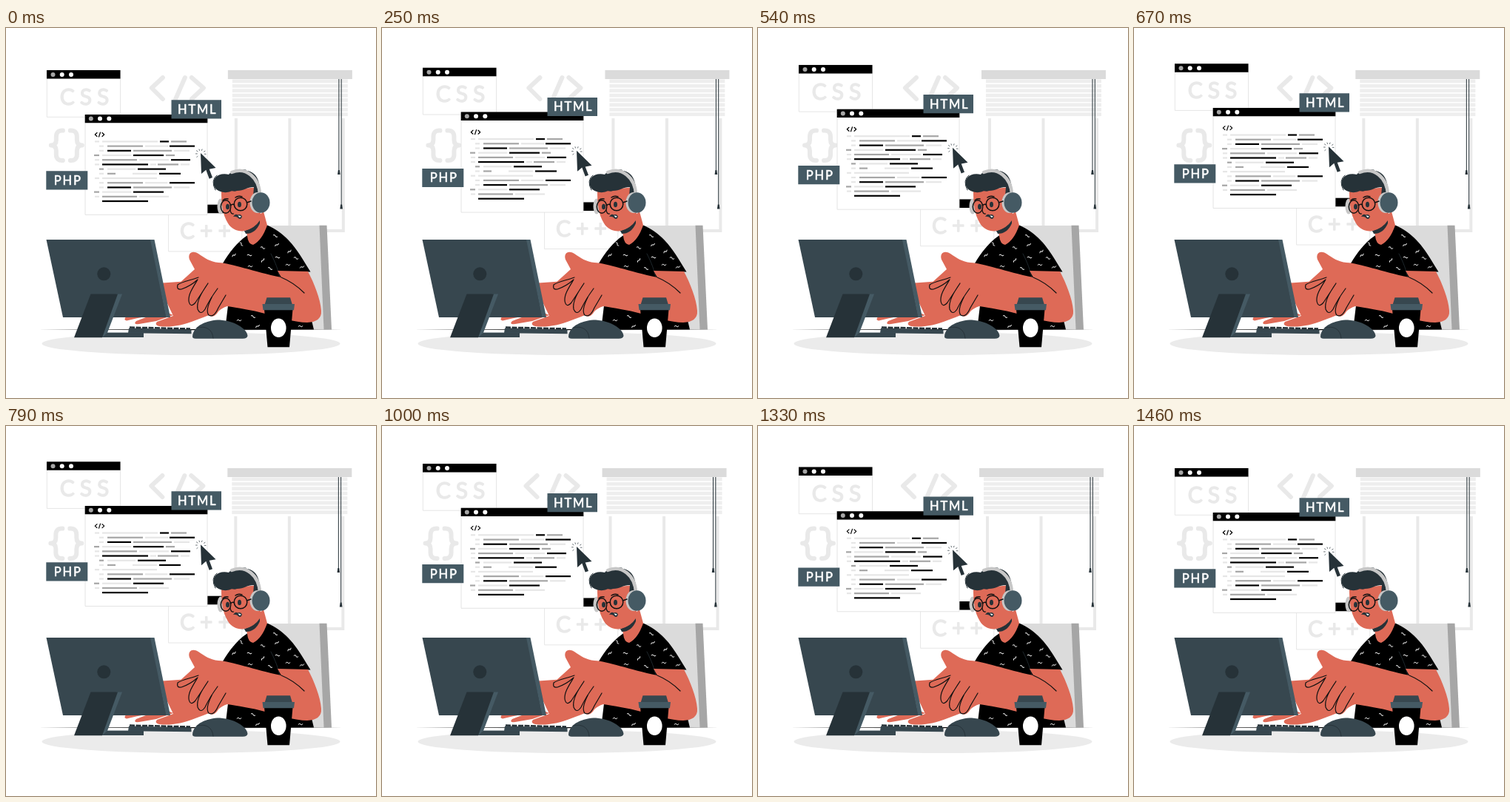
Recreate the animation shown at these times as an HTML page. Size 500 by 500 pixels, loop 1.5 s.

```html
<!DOCTYPE html>
<html lang="en">
<head>
<meta charset="utf-8">
<title>Developer at work</title>
<style>
  html, body { margin: 0; height: 100%; overflow: hidden; background: #fff; }
  svg { display: block; width: 100%; height: 100%; }
  text { font-family: Lato, "Open Sans", sans-serif; text-anchor: middle; stroke-linejoin: round; }
  .ghost { fill: #e9e9e9; stroke: #e9e9e9; stroke-width: 1.4; font-size: 30px; letter-spacing: 7px; }
  .tag { fill: #fff; stroke: #fff; stroke-width: .6; font-size: 16.5px; letter-spacing: 1.8px; }
  .line { fill: none; stroke-linecap: round; stroke-linejoin: round; }
  .skin { fill: #de6a57; }
  .dark { fill: #263238; }
  .slate { fill: #37474f; }
  .steel { fill: #455a64; }
  .ink { stroke: #111; }
</style>
</head>
<body>
<svg viewBox="0 0 500 500">
  <defs>
    <g id="dots">
      <circle cx="8.5" cy="6" r="3" fill="#a6a6a6"/>
      <circle cx="20.7" cy="6" r="3" fill="#fff"/>
      <circle cx="33" cy="6" r="3" fill="#fff"/>
    </g>
    <g id="pane">
      <path d="M.3 0H99.5V63.2H.3Z" fill="#fff" stroke="#e0e0e0" stroke-width=".8"/>
      <path d="M0 0H99.5V11.5H0Z"/>
      <use href="#dots"/>
    </g>
    <path id="fleck" class="line" d="M-2.8 .7Q-1.2 -1.6 0 0T2.8 -.7" stroke="#fff" stroke-width=".9"/>
  </defs>

  <g id="shaking">
    <path d="M311 69V274H456V69M383.5 69V274" fill="none" stroke="#e9e9e9" stroke-width="4"/>
    <path d="M306 69H462V122H306Z" fill="#fff"/>
    <g id="slats" fill="#eee"></g>
    <path d="M300 57H468V69H300Z" fill="#dbdbdb"/>
    <path d="M450 69V194M453.3 69V240" stroke="#263238"/>
    <path class="dark" d="M449 192h2l.8 6h-3.6zM452.3 238.5h2l.8 6h-3.6z"/>
    <g class="line" stroke="#e9e9e9" stroke-width="6">
      <path d="M212 67L197 81L212 96M242 67L228 99M251 67L267 81L251 96"/>
      <path d="M77 138.5Q68 138 68 147V151Q68 158.5 61 158.5Q68 158.5 68 166V171Q68 179.5 77 179M87 138.5Q96 138 96 147V151Q96 158.5 103 158.5Q96 158.5 96 166V171Q96 179.5 87 179"/>
    </g>
  </g>

  <g id="floating">
    <use href="#pane" x="55" y="57.4"/>
    <text class="ghost" x="109.5" y="104">CSS</text>
    <use href="#pane" x="219.3" y="239"/>
    <text class="ghost" x="273" y="285.5">C++</text>
    <path d="M107 117.300H272V252.700H107Z" fill="#fff" stroke="#dedede" stroke-width=".8"/>
    <path d="M106.700 117.200H272.300V128.500H106.700Z"/>
    <use href="#dots" x="106.300" y="116.900"/>
    <path class="line" d="M123 141.800L120.300 144.300L123 146.800M127.500 141.300L125.500 147.300M130 141.800L132.700 144.300L130 146.800" stroke="#000" stroke-width="1.200"/>
    <g id="code"></g>
    <path class="steel" d="M223.500 97.500H291V122.700H223.500ZM54.300 193.500H110.300V218.700H54.300Z"/>
    <text class="tag" x="258.700" y="116">HTML</text>
    <text class="tag" x="83.700" y="212">PHP</text>
    <path class="dark" d="M263 169.300L264 197.300L270.300 192L274.700 204L279 202.300L274.700 191L283.500 189.300Z"/>
    <path class="line" d="M259 173.700L257.800 174.700M258.300 170.200L256.500 170.200M259 167.200L257.500 166M261.500 165.700L261 164.200M264.500 165.700L265 164.200M267.500 167.500L269 166.500M268.300 170.500L270 170.700" stroke="#263238" stroke-width=".7"/>
  </g>

  <ellipse cx="250" cy="426.500" rx="201.500" ry="15.500" fill="#ebebeb"/>
  <path d="M350 267H424.500L430 407.500H350Z" fill="#dbdbdb"/>
  <path d="M423.500 266.700H433.500L440 407.500H429.500Z" fill="#a6a6a6"/>
  <path d="M42 407.700L250 407L457 407.700L250 408.200Z"/>

  <!-- torso -->
  <path d="M325 281C313 289 301 304 293 318L303 350L297 400V407.500H416L413 395L372 329L411.500 329.500C403 316 393 298 382 287C374 278 363 271 353 266.500Z"/>
  <g id="flecks"></g>
  <path class="line" d="M358 305C364 317 368 327 370 338" stroke="#263238" stroke-width=".8"/>

  <!-- neck and head -->
  <path class="skin" d="M323 268L326 281Q327 292 334 293Q346 287 353 266.500L348 248Z"/>
  <path class="dark" d="M322 274Q336 271 343 260V264Q337 278 324 278Z"/>
  <ellipse cx="290" cy="241" rx="4.500" ry="10.500" fill="#c7c7c7"/>
  <path class="skin" d="M291 220C291 236 292 251 300 264C306 274 319 277 328 272C336 269 342 262 344 252L341 215Z"/>
  <path class="dark" d="M281 213C278 203 287 195 301 198C307 191 328 189 337 199C343 207 344 217 342 226L334 227L335 215C325 215 322 220 312 220C308 222 306 219 303 221C296 224 283 221 281 213Z"/>
  <path class="line" d="M285 199Q276 206 283 219M303 197Q310 190 324 192" stroke="#263238"/>
  <path class="line" d="M305 195C324 187 342 202 343 225" stroke="#c7c7c7" stroke-width="4.500"/>
  <ellipse cx="340" cy="236" rx="10.500" ry="14" fill="#c7c7c7"/>
  <ellipse class="steel" cx="344.500" cy="236" rx="12" ry="13.700"/>
  <g class="line ink" stroke-width="1.500">
    <ellipse cx="297" cy="241.500" rx="6.700" ry="8.700"/>
    <circle cx="317" cy="238" r="8.800"/>
    <path d="M303.500 240Q306 237 308.500 239M325.500 236L331 234M293 233Q296 230 300 231M310 229Q314 226 319 228"/>
    <path d="M303 246Q304 252 307.500 251" stroke-width="1.200"/>
  </g>
  <ellipse class="dark" cx="299.500" cy="241.500" rx="2.500" ry="3.800"/>
  <ellipse class="dark" cx="315.500" cy="238.500" rx="2.500" ry="3.800"/>
  <path class="dark" d="M307 255Q310 250 313 252.500Q317 251 319 254.500Q318 259 314.500 257.500Q312 254 307 255Z"/>
  <path d="M313.500 253.500Q316.500 253 318 255L315.500 256Z" fill="#fff"/>

  <!-- far arm and fingers -->
  <path class="skin" d="M205 345L240 342.500L290 350L300 374C286 384 270 390 256 395C238 402 222 405 207 403Q200 401 204 397L226 389ZM165 388Q157 394 163 395.500L178 392L194 389L176 396Q171 401 180 400L203 396L226 388L214 383Z"/>

  <!-- near arm and hand -->
  <path class="skin" d="M367 328L408 329C416 344 425 366 426 382Q427 397 407 398C390 398 370 391 350 386C332 381 312 378 299 376Q291 378 287 383Q281 393 274 388Q267 389 265 385Q258 388 259 376Q249 379 247 370L251 357L257 345Q245 350 237 354Q229 353 234 345L255 326L248 313C245 304 252 300 260 305C269 311 276 316 287 317C305 318 334 329 372 337Z"/>
  <g class="line ink" stroke-width="1.200">
    <path d="M372 337Q389 344 403 358"/>
    <path d="M260 337C249 341 237 343 232 347Q230 354 237 353Q249 349 259 340C253 350 246 360 247 369Q249 379 256 371Q264 359 273 345C264 358 257 370 259 380Q263 389 269 380Q275 367 286 352"/>
    <path d="M278 364Q269 382 274 388Q281 392 287 378L297 361"/>
  </g>

  <!-- desk -->
  <path class="slate" d="M166 405.500L250.500 407.500V413.300L165 412.300Z"/>
  <path d="M167 404.500L249 406.500" stroke="#263238" stroke-width="2.500" stroke-dasharray="7 1.500"/>
  <path class="slate" d="M252 417C253 402 272 394.500 289 394.500C310 396 326 407 326.500 416Q326 419.700 320 419.700H257Q252 420 252 417Z"/>
  <path class="line" d="M258 405C270 402 279 407 280 419" stroke="#263238" stroke-width=".9"/>
  <path class="slate" d="M54.500 286H196L217 391H77Z"/>
  <path class="steel" d="M195 286H200.500L222 391H216.500Z"/>
  <circle class="dark" cx="132.300" cy="332.300" r="9"/>
  <path class="steel" d="M149 359.500H157L137 411.700H186V418H125Z"/>
  <path class="slate" d="M137 411.700H186V418H130Z"/>
  <path class="dark" d="M114.500 359.500H151L130 418.300H92Z"/>

  <!-- cup -->
  <path d="M349 380H387.500L383 431.300H353.500Z"/>
  <ellipse cx="368.300" cy="405.200" rx="10.300" ry="12.800" fill="#fff"/>
  <path class="slate" d="M352.500 364.300H384L387 374H349.500Z"/>
  <path class="steel" d="M346.500 373H390L389 381.300H347.500Z"/>
</svg>
<script>
  const $ = id => document.getElementById(id);
  const PERIOD = 1500;
  const STEPS = 36;

  $("slats").innerHTML = Array.from({ length: 8 }, (_, i) =>
    `<rect x="306" y="${69.5 + i * 6.4}" width="156" height="4.8"/>`).join("");

  // Each run: shade, start and end; l = light, g = grey, k = black.
  const shades = { l: "#e6e6e6", g: "#a6a6a6", k: "#000" };
  const rows = [
    "l120-126 l130-205 k208-220 g223-244",
    "l126-132 g137-185 l188-219 k221-255",
    "l126-132 k137-169 g172-224 l227-248",
    "g119-126 l130-169 k172-213 g216-228",
    "l120-126 g130-177 l180-220 k223-249",
    "l120-126 k130-192 l195-203 g205-233 l236-248",
    "g126-132 l137-175 k178-216",
    "l126-132 g137-148 l171-204 k207-236",
    "l120-126 l130-204",
    "l126-132 g137-185 l188-218 k221-255",
    "l126-132 k137-169 g172-224 l227-248",
    "g119-126 l130-169 k172-213",
    "l120-126 g130-177 l180-220",
    "k130-192"
  ];
  $("code").innerHTML = rows.map((row, i) => row.split(" ").map(run => {
    const [from, to] = run.slice(1).split("-");
    return `<rect x="${from}" y="${152.6 + i * 6.2}" width="${to - from}" height="2.2" fill="${shades[run[0]]}"/>`;
  }).join("")).join("");

  const flecks = [
    [318, 292, 60], [308, 307, -30], [329, 307, 20], [347, 297, 30], [364, 281, 40],
    [366, 293, -20], [347, 314, -40], [367, 310, 20], [383, 302, -30], [392, 311, 30],
    [381, 320, 10], [400, 323, -10], [330, 322, 10], [357, 325, 40], [315, 395, 10],
    [334, 390, 40], [340, 403, -20], [398, 403, 10]
  ];
  $("flecks").innerHTML = flecks.map(([x, y, turn]) =>
    `<use href="#fleck" transform="translate(${x} ${y}) rotate(${turn})"/>`).join("");

  const shakeStops = [0, -1, 2, -4, 4, -4, 4, -4, 2, -1, 0];
  function shake(phase) {
    const stop = Math.floor(phase * 10);
    const from = shakeStops[stop], to = shakeStops[stop + 1];
    return from + (to - from) * (phase * 10 - stop);
  }

  const float = phase => -10 * (1 - Math.abs(1 - 2 * phase));

  // The motion advances at 24 steps a second, each posed at its middle;
  // the small lead absorbs step times rounded down to 10 ms.
  function draw(now) {
    const step = Math.floor((now + 4) * STEPS / PERIOD) % STEPS;
    const phase = (step + .5) / STEPS;
    $("shaking").setAttribute("transform", `translate(${shake(phase)} 0)`);
    $("floating").setAttribute("transform", `translate(0 ${float(phase)})`);
    requestAnimationFrame(draw);
  }
  requestAnimationFrame(draw);
</script>
</body>
</html>
```
